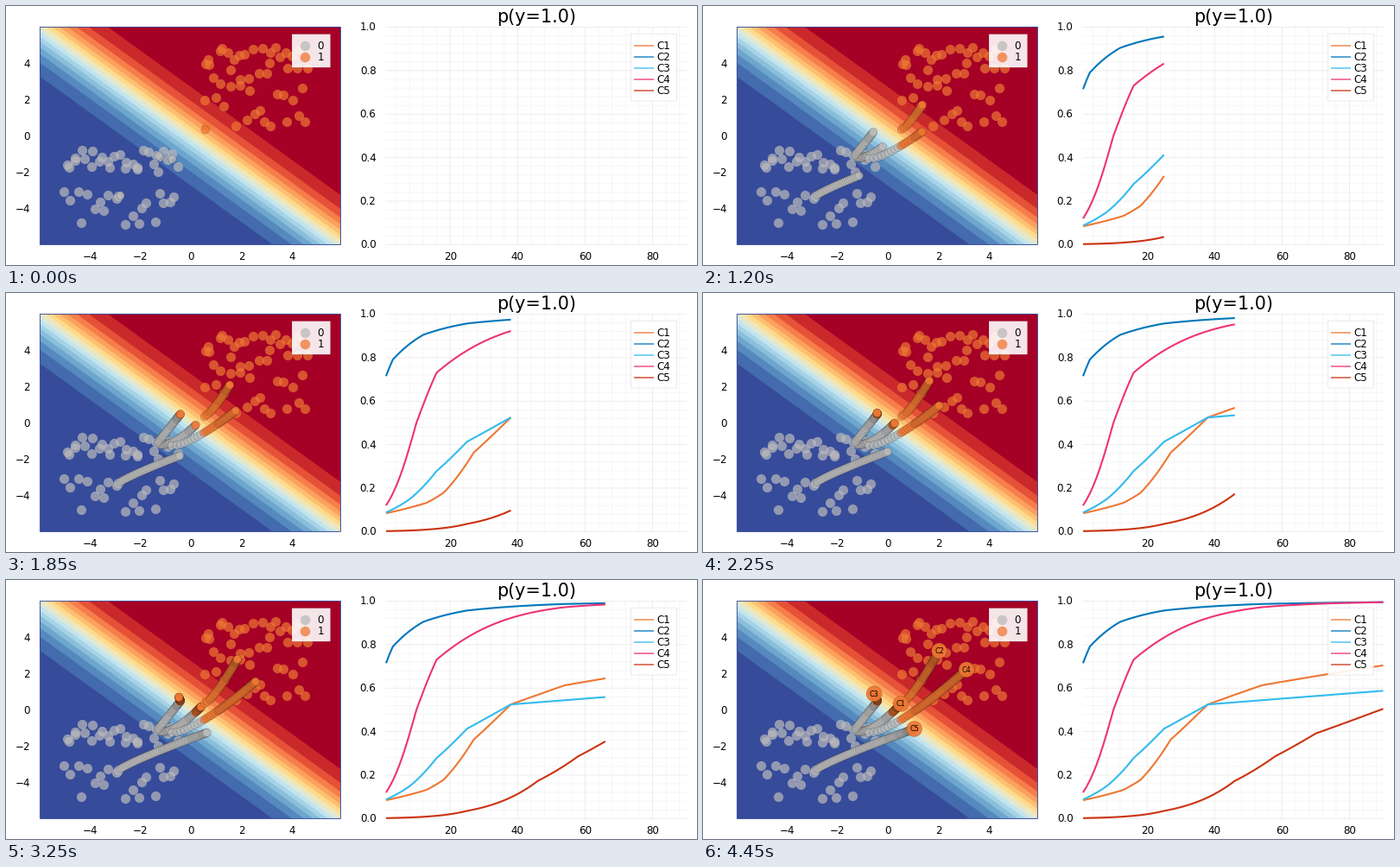
A matplotlib script that plays this animation: 800x300 px, repeating every 4500 ms.

```python
import numpy as np
import matplotlib.pyplot as plt
from matplotlib.animation import FuncAnimation
from matplotlib.colors import LinearSegmentedColormap, to_rgba
from matplotlib.patches import Circle, Polygon, Rectangle

plt.rcParams["font.family"] = "DejaVu Sans"
plt.rcParams["path.snap"] = False

STEPS = 90
INTERVAL = 50
DPI = 100
PT = 72 / DPI  # points per pixel

ORANGE, BLUE, CYAN, PINK, RED, GRAY = (
    "#ee7733", "#0077bb", "#33bbee", "#ee3377", "#cc3311", "#bbbbbb")
SUNSET = ["#364b9a", "#4a7bb7", "#6ea6cd", "#98cae1", "#c2e4ef", "#eaeccc",
          "#feda8b", "#fdb366", "#f67e4b", "#dd3d2d", "#a50026"]
EDGE = (0, 0, 0, 0.3)

# Panel edges in pixels: left, top, right, bottom
LEFT = (39.4, 24.4, 387.4, 276.4)
RIGHT = (440, 24.4, 787.6, 276.4)


def bend(power):
    return lambda g: g ** power


def turn_back(g):
    """Run ahead of the goal, then return to it."""
    return np.minimum(1.3 * g, 1 + 1.9 * (1 - g))


# name, colour, first x, last x, sideways easing, (iteration, score) key points
PATHS = [
    ("C1", ORANGE, -1.24, 0.51, bend(0.75),
     [(1, -2.38), (13, -1.88), (18, -1.53), (27, -0.56), (38, 0.10),
      (54, 0.46), (90, 0.87)]),
    ("C2", BLUE, 0.54, 2.03, bend(0.85),
     [(1, 0.92), (3, 1.33), (12, 2.25), (25, 3.1), (54, 4.33), (90, 5.3)]),
    ("C3", CYAN, -1.31, -0.55, turn_back,
     [(1, -2.34), (8, -1.74), (16, -0.95), (25, -0.35), (38, 0.10),
      (90, 0.355)]),
    ("C4", PINK, -0.76, 3.11, bend(0.85),
     [(1, -1.99), (4, -1.33), (10, 0), (16, 1), (54, 3.55), (90, 5.35)]),
    ("C5", RED, -2.81, 1.04, bend(1.05),
     [(1, -6.03), (25, -3.3), (46, -1.56), (58, -0.91), (70, -0.44),
      (90, 0.02)]),
]


def sigmoid(s):
    return 1 / (1 + np.exp(-s))


def feature_px(x, y):
    return 214.2 + 29.2 * x, 151 - 21.1 * y


def iter_px(n):
    return 440 + 3.905 * (n - 1)


def prob_px(p):
    return 276.4 - 251.9 * p


fig = plt.figure(figsize=(800 / DPI, 300 / DPI), dpi=DPI, facecolor="white")
ax = fig.add_axes([0, 0, 1, 1])
ax.set_xlim(0, 800)
ax.set_ylim(300, 0)
ax.axis("off")


def label(x, y, s, size=11.9, ha="center", **kw):
    return ax.text(x, y + 0.365 * size, s, fontsize=size * PT, ha=ha,
                   va="baseline", color="black", **kw)


def box(x0, y0, x1, y1, **kw):
    return ax.add_patch(Rectangle((x0, y0), x1 - x0, y1 - y0, **kw))


def dots(xs, ys, color, radius, alpha, z):
    return ax.scatter(xs, ys, s=(2 * radius * PT) ** 2, color=color,
                      alpha=alpha, linewidths=0, zorder=z)


def draw_bands(count=16):
    cmap = LinearSegmentedColormap.from_list("bands", SUNSET, N=1024)
    colors = cmap(np.linspace(0, 1, count))
    area = box(*LEFT, fc=colors[0], ec="none", zorder=0)
    for i in range(1, count):
        s = np.log(i / (count - i))
        corners = [feature_px(-20, s + 20), feature_px(20, s - 20),
                   feature_px(20, s + 20)]
        band = ax.add_patch(Polygon(corners, fc=colors[i], ec="none", zorder=1))
        band.set_clip_path(area)
    box(*LEFT, fc="none", ec=SUNSET[0], lw=0.9 * PT, zorder=2)


def draw_data():
    """Each class is a dense band of points above a looser one."""
    rng = np.random.default_rng(4)
    for color, x0, x1, dense, loose in (
            (GRAY, -5, -0.6, (-2, -0.7), (-5, -2.2)),
            (ORANGE, 0.5, 4.6, (3, 4.9), (0.5, 2.9))):
        for (y0, y1), count in ((dense, 28), (loose, 21)):
            x = np.linspace(x0, x1, count) + rng.uniform(-0.1, 0.1, count)
            y = rng.uniform(y0, y1, count)
            dots(*feature_px(x, y), color, 5.6, 0.7, 3)


def draw_grid():
    x0, y0, x1, y1 = RIGHT

    def rule(xs, ys, major):
        ax.plot(xs, ys, color="#e9e9e9" if major else "#f4f4f4",
                lw=0.8 * PT, zorder=1 if major else 0.5)

    for n in range(4, STEPS, 4):
        rule([iter_px(n)] * 2, [y0, y1], n % 20 == 0)
    for i in range(26):
        rule([x0, x1], [prob_px(i / 25)] * 2, i % 5 == 0)


def draw_labels():
    for v in (-4, -2, 0, 2, 4):
        s = str(v).replace("-", "\u2212")
        x, y = feature_px(v, v)
        label(x, 289.5, s)
        label(28.2, y - 0.4, s, ha="right")
    for n in (20, 40, 60, 80):
        label(iter_px(n), 289.5, str(n))
    for i in range(6):
        label(428.6, prob_px(i / 5) - 0.4, f"{i / 5:.1f}", ha="right")
    label(614, 11.8, "p(y=1.0)", size=20.8)


def draw_legends():
    style = dict(fc=(1, 1, 1, 0.9), ec=(0, 0, 0, 0.1), lw=0.8 * PT, zorder=8)
    box(331, 32.6, 375.6, 71.2, **style)
    for i, color in enumerate((GRAY, ORANGE)):
        y = 46 + 12.8 * i
        dots([346], [y], color, 5.8, 0.75, 9)
        label(360.4, y, str(i), ha="left", zorder=9)
    box(723.4, 32.2, 776.6, 110, **style)
    for i, (name, color, *_) in enumerate(PATHS):
        y = 46 + 13 * i
        ax.plot([727, 750], [y, y], color=color, lw=1.3 * PT, zorder=9,
                solid_capstyle="butt")
        label(753.5, y, name, ha="left", zorder=9)


class Walk:
    """One path through feature space with its probability curve."""

    def __init__(self, name, color, x0, x1, ease, keys):
        score = np.interp(iterations, *zip(*keys))
        x = x0 + (x1 - x0) * ease((score - score[0]) / (score[-1] - score[0]))
        # the model's score is the sum of both features
        self.points = np.column_stack(feature_px(x, score - x))
        self.p = sigmoid(score)
        self.fills = [to_rgba(ORANGE if p >= 0.5 else GRAY, 0.7) for p in self.p]
        self.trail = dots(*self.points.T, GRAY, 4.7, None, 4)
        self.trail.set_linewidths(0.5 * PT)
        self.trail.set_edgecolors([EDGE])
        self.line, = ax.plot([], [], color=color, lw=2.1 * PT, zorder=5,
                             solid_capstyle="butt")
        end = self.points[-1]
        self.badge = [
            ax.add_patch(Circle(end, 9, fc=to_rgba(ORANGE, 0.92), ec=EDGE,
                                lw=0.5 * PT, zorder=6)),
            label(*end, name, size=8, zorder=7)]

    def show(self, n):
        self.trail.set_offsets(self.points[:n])
        self.trail.set_facecolors(self.fills[:n])
        drawn = n if n > 1 else 0
        self.line.set_data(iter_px(iterations[:drawn]), prob_px(self.p[:drawn]))
        for part in self.badge:
            part.set_visible(n == STEPS)
        return [self.trail, self.line, *self.badge]


draw_bands()
draw_data()
draw_grid()
draw_labels()
draw_legends()
iterations = np.arange(1, STEPS + 1)
walks = [Walk(*spec) for spec in PATHS]


def update(k):
    return [artist for walk in walks for artist in walk.show(k + 1)]


anim = FuncAnimation(fig, update, frames=STEPS, interval=INTERVAL,
                     repeat=True, repeat_delay=0, blit=False)
plt.show()
```
